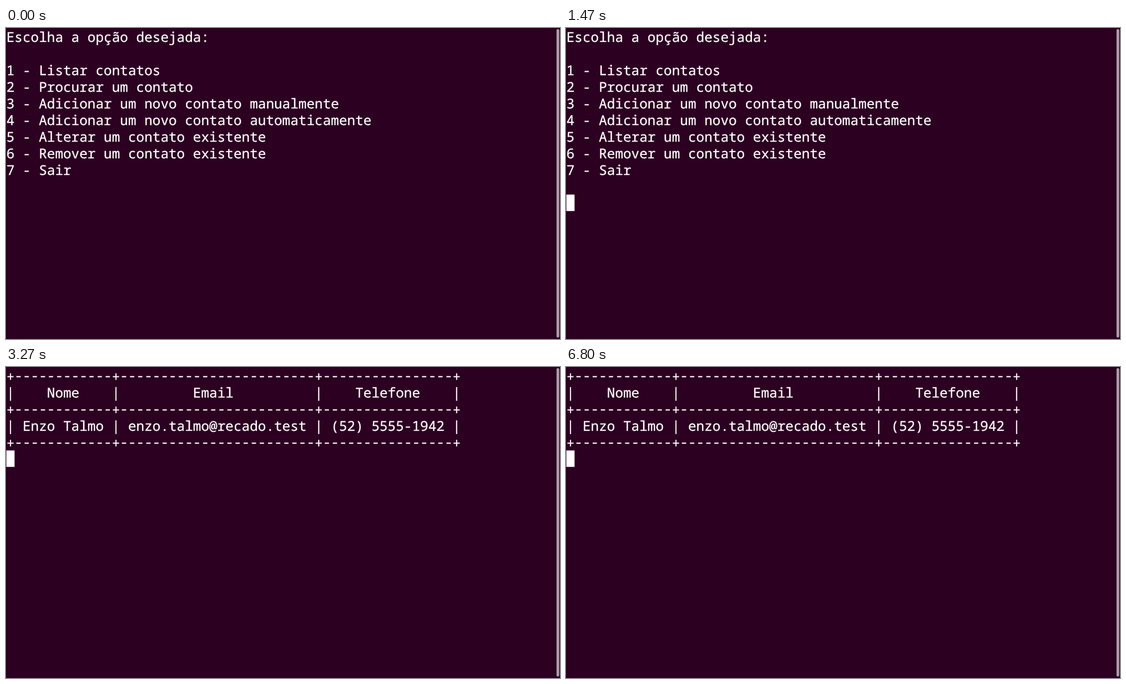
Animation, 998 px wide and 561 px high, one loop 7.27 s. Source, as an HTML page:

```html
<!DOCTYPE html>
<html lang="pt-BR">
<head>
<meta charset="utf-8">
<title>Agenda de contatos</title>
<style>
  html, body { margin: 0; width: 100%; height: 100%; overflow: hidden; background: #2c0021; }
  svg { display: block; width: 998px; height: 561px; }
  text {
    font: 24.367px "Noto Sans Mono", "DejaVu Sans Mono", monospace;
    font-variant-ligatures: none;
    text-rendering: geometricPrecision;
    white-space: pre;
    fill: #fff;
    stroke: #fff;
    stroke-width: .3px;
  }
  .bar { fill: #aaa3a8; }
  .cursor { fill: #fff; }

  #menu, #table, #key, .cursor { animation: 7270ms step-end infinite; }
  #menu { animation-name: menu; }
  #table { animation-name: table; }
  #key { animation-name: key; }
  .cursor { animation-name: blink, place; }

  @keyframes menu {
    0% { opacity: 1; }
    44.979%, 100% { opacity: 0; }
  }
  @keyframes table {
    0% { opacity: 0; }
    44.979%, 100% { opacity: 1; }
  }
  @keyframes key {
    0% { opacity: 0; }
    33.975% { opacity: 1; }
    44.979%, 100% { opacity: 0; }
  }
  /* 600 ms blink, restarted by each key press */
  @keyframes blink {
    0%, 9.215%, 25.722%, 41.265%, 52.269%, 69.738%, 85.281% { opacity: 0; }
    0.962%, 17.468%, 33.012%, 44.016%, 61.485%, 77.028%, 93.535%, 100% { opacity: 1; }
  }
  @keyframes place {
    0% { transform: translate(0, 300px); }
    33.975% { transform: translate(14.62px, 300px); }
    44.979%, 100% { transform: translate(0, 150px); }
  }
</style>
</head>
<body>
<svg viewBox="0 0 998 561">
  <g id="menu">
    <text x=".7" y="25">Escolha a opção desejada:</text>
    <text x=".7" y="85">1 - Listar contatos</text>
    <text x=".7" y="115">2 - Procurar um contato</text>
    <text x=".7" y="145">3 - Adicionar um novo contato manualmente</text>
    <text x=".7" y="175">4 - Adicionar um novo contato automaticamente</text>
    <text x=".7" y="205">5 - Alterar um contato existente</text>
    <text x=".7" y="235">6 - Remover um contato existente</text>
    <text x=".7" y="265">7 - Sair</text>
  </g>
  <text id="key" x=".7" y="325">1</text>
  <g id="table">
    <!-- dashes are raised to the middle of the plus signs -->
    <text id="rule" x=".7" y="26">+<tspan dy="-1.7">------------</tspan><tspan dy="1.7">+</tspan><tspan dy="-1.7">------------------------</tspan><tspan dy="1.7">+</tspan><tspan dy="-1.7">----------------</tspan><tspan dy="1.7">+</tspan></text>
    <use href="#rule" y="60"/>
    <use href="#rule" y="120"/>
    <text x=".7" y="55">|    Nome    |         Email          |    Telefone    |</text>
    <text x=".7" y="115">| Enzo Talmo | enzo.talmo@recado.test | (52) 5555-1942 |</text>
  </g>
  <rect class="cursor" x=".7" y=".5" width="14.7" height="29.7"/>
  <rect class="bar" x="991.8" y="2" width="4.8" height="556.5" rx="2.4"/>
</svg>
</body>
</html>
```
